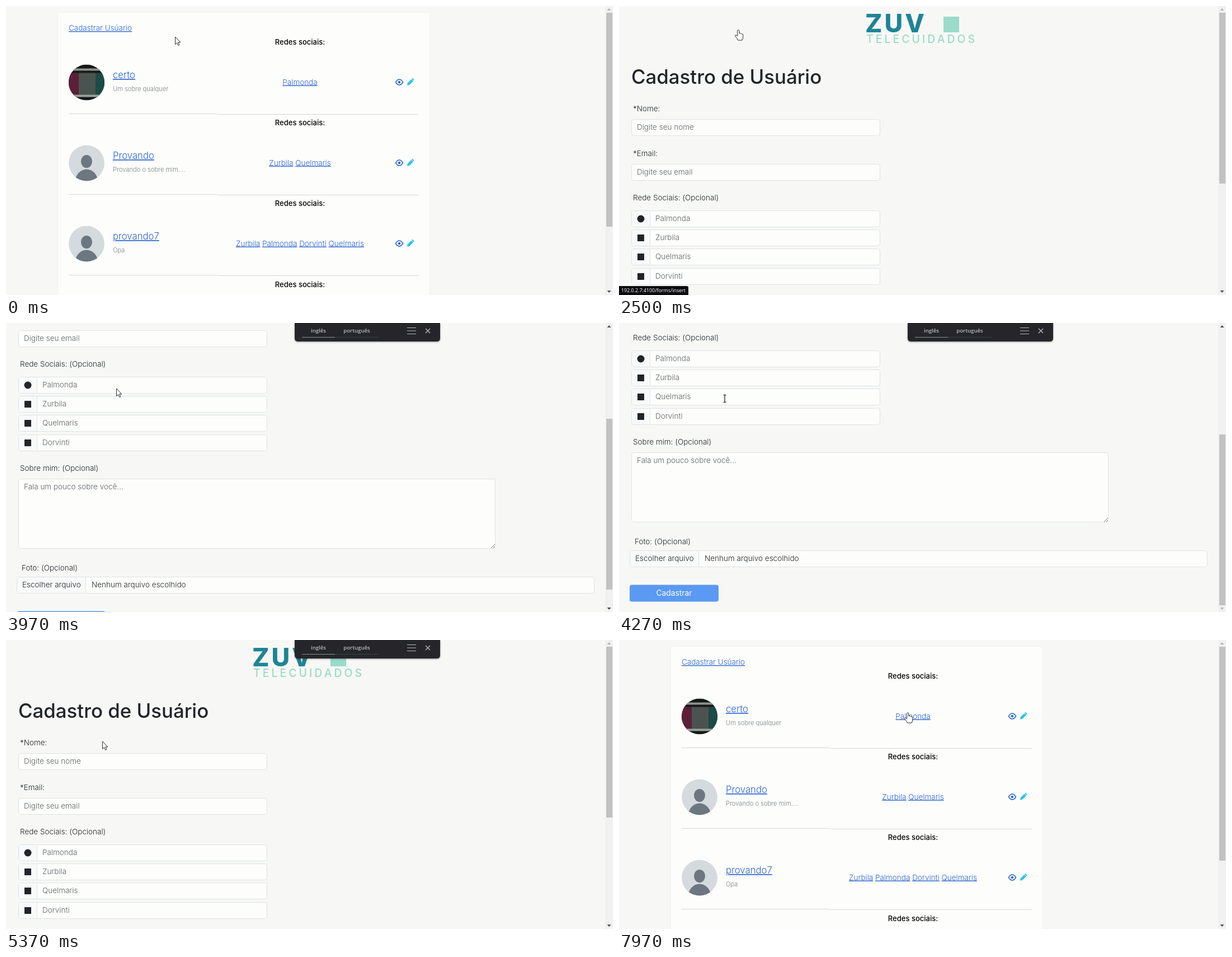
Write an HTML page that moves like this. It is 1085 by 516 pixels and loops after 8 s.

```html
<!DOCTYPE html>
<html lang="pt-BR">
<head>
<meta charset="utf-8">
<title>Cadastro</title>
<style>
  html, body { margin: 0; width: 100%; height: 100%; overflow: hidden; background: #f7f8f6; }
  svg { display: block; position: absolute; left: 0; top: 0; }
  text {
    font-family: Inter, "Open Sans", sans-serif; font-size: 13.5px; font-weight: 300;
    font-feature-settings: "calt" 0; fill: #212529;
  }
  .link { fill: #2a63d4; text-decoration: underline; }
  .mid { text-anchor: middle; }
  .head { font-size: 13px; font-weight: 500; fill: #000; }
  .user { font-size: 16.7px; }
  .about { font-size: 11.15px; fill: #7a8186; }
  .title { font-size: 34.8px; font-weight: 500; }
  .hint { fill: #5c6268; }
  .brand { font-size: 45px; font-weight: 800; letter-spacing: 4px; fill: #1f8496; }
  .tagline { font-size: 19.5px; font-weight: 500; letter-spacing: 4px; fill: #9adbc9; }
  .button { font-weight: 400; fill: #fff; font-size: 13.8px; }
  .tab { font: 600 9.6px "Open Sans", "Noto Sans", sans-serif; fill: #b3b9bd; }
  .field { fill: #fdfdfb; stroke: #dee2e6; }
  #status {
    position: absolute; left: 0; bottom: 0; height: 16px; padding: 0 5px 0 4px;
    font: 8.9px/16px "Open Sans", "Noto Sans", sans-serif; color: #fff;
    background: #0b0b10; border-top-right-radius: 3px; white-space: nowrap;
  }
</style>
</head>
<body>
<svg id="stage" width="1085" height="516" viewBox="0 0 1085 516"></svg>
<div id="status"></div>
<script>
const LOOP = 8000, VIEW = 516, TRACK_TOP = 12, TRACK = 492;
const LIST_MAX = 149, FORM_MAX = 316;
const FORM_START = 2500, FORM_END = 6630;
const $ = id => document.getElementById(id);

const text = (x, y, cls, str) => `<text x="${x}" y="${y}" class="${cls}">${str}</text>`;
const rect = (x, y, w, h, attrs = '') => `<rect x="${x}" y="${y}" width="${w}" height="${h}" ${attrs}/>`;
const line = (x1, y1, x2, y2, color) => `<path d="M${x1} ${y1}L${x2} ${y2}" stroke="${color}" fill="none"/>`;

// List page
const photo = `<g clip-path="url(#round)">
  ${rect(-32, -32, 64, 64, 'fill="#17191b"')}
  ${rect(-32, -17, 18, 41, 'fill="#5c1f38"')}
  ${rect(-14, -17, 30, 41, 'fill="#4b5350"')}
  ${rect(16, -17, 16, 41, 'fill="#1c4b46"')}
  ${rect(-24, -25, 48, 4, 'fill="#8d9488"')}
  ${rect(-32, 22, 64, 4, 'fill="#9aa199"')}</g>`;

const silhouette = `<g clip-path="url(#round)">
  <circle r="32" fill="#d4dadd"/>
  <ellipse cy="-3" rx="10" ry="11.5" fill="#6c777f"/>
  <ellipse cy="34" rx="20.5" ry="23" fill="#6c777f"/></g>`;

const eye = `<g transform="translate(703 136)" fill="none" stroke="#2a63d4" stroke-width="1.5">
  <path d="M-6.5 0Q-3.5-5 0-5T6.5 0Q3.5 5 0 5T-6.5 0Z"/><circle r="2.2" fill="#2a63d4" stroke="none"/></g>`;

const pencil = `<g transform="translate(722.5 136) rotate(45)" fill="#2bc6e6">
  <path d="M-2.4-5.2H2.4V4.2L0 8L-2.4 4.2Z"/>${rect(-2.4, -8.2, 4.8, 2.2, 'rx="1"')}</g>`;

const people = [
  ['certo', 'Um sobre qualquer', ['Palmonda']],
  ['Provando', 'Provando o sobre mim....', ['Zurbila', 'Quelmaris']],
  ['provando7', 'Opa', ['Zurbila', 'Palmonda', 'Dorvinti', 'Quelmaris']],
  ['provando8', 'Opa', ['Quelmaris']]
];

const person = ([name, about, nets], i) => `<g transform="translate(0 ${Math.round(i * 144.2)})">
  ${text(525.5, 69, 'mid head', 'Redes sociais:')}
  <g transform="translate(144 136.5)">${i ? silhouette : photo}</g>
  ${text(191, 129, 'user link', name)}
  ${text(191, 152, 'about', about)}
  ${text(525.5, 140.5, 'mid', nets.map(n => `<tspan class="link">${n}</tspan>`).join(' '))}
  ${eye}${pencil}
  ${line(112, 192.5, 377, 192.5, '#d3d5da')}${line(378, 193.5, 738, 193.5, '#d5d7dc')}</g>`;

const listPage = `<g id="list">
  ${rect(92.5, 11.5, 665, 634, 'rx="3" fill="#fdfdfb" stroke="#f0f1f0"')}
  ${text(112, 44, 'link', 'Cadastrar Usúario')}
  ${people.map(person).join('')}</g>`;

// Form page
const field = (x, y, w, h) => rect(x + .5, y + .5, w, h, 'rx="4" class="field"');
const input = (y, hint) => field(22, y, 444, 29) + text(32, y + 19.3, 'hint', hint);

const network = (name, i) => {
  const y = 365 + Math.round(i * 34.2);
  const mark = i ? rect(33, y + 9, 12, 12, 'fill="#212529"')
                 : `<circle cx="39" cy="${y + 15}" r="6.5" fill="#212529"/>`;
  return field(22, y, 444, 29) + rect(23, y + 1, 32, 28, 'rx="3" fill="#f8f9f9"')
    + line(55.5, y, 55.5, y + 30, '#dee2e6') + mark + text(65, y + 19.3, 'hint', name);
};

const formPage = `<g id="form">
  ${text(440, 47, 'brand', 'ZUV')}
  ${rect(580, 19, 28, 28, 'fill="#9adbc9"')}
  ${text(442, 66, 'tagline', 'TELECUIDADOS')}
  ${text(22, 139, 'title', 'Cadastro de Usuário')}
  ${text(25, 188, '', '*Nome:')}${input(202, 'Digite seu nome')}
  ${text(25, 267.5, '', '*Email:')}${input(282, 'Digite seu email')}
  ${text(25, 347, '', 'Rede Sociais: (Opcional)')}
  ${['Palmonda', 'Zurbila', 'Quelmaris', 'Dorvinti'].map(network).join('')}
  ${text(25, 532.5, '', 'Sobre mim: (Opcional)')}
  ${field(22, 547, 852, 124)}${text(32, 566, 'hint', 'Fala um pouco sobre você...')}
  ${line(867, 671, 874, 664, '#777')}${line(871, 671, 874, 668, '#777')}
  ${text(28, 710.5, '', 'Foto: (Opcional)')}
  ${field(19, 722, 1032, 29)}${rect(20, 723, 122, 28, 'rx="3" fill="#f8f9f9"')}
  ${line(142.5, 722, 142.5, 752, '#dee2e6')}
  ${text(29, 741, '', 'Escolher arquivo')}${text(153, 741, '', 'Nenhum arquivo escolhido')}
  ${rect(19, 783.5, 159, 30, 'rx="4" fill="#5b9af2"')}
  ${text(98.5, 803, 'mid button', 'Cadastrar')}</g>`;

// Browser parts
const popup = `<g id="popup"><g filter="url(#shade)">
  <path d="M516 0H776V27Q776 33 770 33H522Q516 33 516 27Z" fill="#25282b"/></g>
  ${text(558.5, 17, 'mid tab', 'inglês')}${text(627, 17, 'mid tab', 'português')}
  ${line(529, 25.5, 588, 25.5, '#8b9094')}${line(588, 25.5, 666, 25.5, '#3c4246')}
  ${[8.5, 14, 19.5].map(y => line(717, y, 733, y, '#b3b9bd')).join('')}
  <path d="M750 10l8 8m0-8l-8 8" stroke="#b3b9bd" stroke-width="1.4"/></g>`;

const scrollbar = `${rect(1071, 0, 14, VIEW, 'fill="#f1f1f1"')}
  <path id="up" d="M1074.5 8h7l-3.5-4z"/><path id="down" d="M1074.5 508h7l-3.5 4z"/>
  <rect id="thumb" x="1073" width="11" fill="#c1c1c1"/>`;

const cursor = `<g id="cursor" fill="#fff" stroke="#111" stroke-width=".9" stroke-linejoin="round">
  <path id="arrow" d="M.5 0V13.5L3.6 10.7L5.7 15.4L7.8 14.5L5.8 9.9H9.8Z"/>
  <path id="hand" d="M-2.4.8Q-.8-1.3.8.8V5.6Q2.6 4.6 3.4 6.4Q5.2 5.6 5.8 7.2Q7.8 6.6 7.8 8.8V12Q7.8 14.6 6.2 18H-1.4Q-3.2 14.6-6.2 10.8Q-7 8.4-4.6 8.8L-2.4 10.6Z"/>
  <path id="beam" fill="none" stroke-width="1.2" d="M-2.5-6.5H-.5L0-6L.5-6.5H2.5M0-6V6M-2.5 6.5H-.5L0 6L.5 6.5H2.5"/></g>`;

$('stage').innerHTML = `<defs>
  <clipPath id="round"><circle r="32"/></clipPath>
  <filter id="shade" x="-5%" y="-20%" width="110%" height="150%">
    <feDropShadow dx="0" dy="1" stdDeviation="1.5" flood-opacity=".4"/></filter></defs>
  ${listPage}${formPage}${scrollbar}${popup}${cursor}`;

// Motion: each key is [time, ...values]
const scrollKeys = [
  [30, 0], [500, LIST_MAX], [900, LIST_MAX], [1650, 0],
  [3430, 0], [3570, 95], [3800, 190], [4030, 285], [4270, FORM_MAX],
  [4970, FORM_MAX], [5340, 0], [5430, 0], [5770, FORM_MAX], [5800, FORM_MAX], [6200, 0]
];
const cursorKeys = [
  [300, 302, 55], [830, 600, 180], [1730, 716, 220], [2150, 214, 43], [2600, 214, 43],
  [3200, 213, 80], [3600, 213, 80], [4200, 189, 135], [4290, 189, 135], [4570, 173, 192],
  [4730, 173, 192], [4830, 171, 193], [4970, 171, 193], [5370, 172, 181], [5950, 172, 181],
  [6180, 150, -30], [6630, 110, -30], [6900, 110, 40], [7300, 205, 119], [7470, 205, 119],
  [7900, 517, 130]
];

const clamp = v => Math.max(0, Math.min(1, v));
const within = (t, a, b) => t >= a && t < b;

function sample(keys, t) {
  const next = keys.findIndex(k => k[0] > t);
  if (next < 0) return keys[keys.length - 1].slice(1);
  if (next === 0) return keys[0].slice(1);
  const a = keys[next - 1], b = keys[next];
  const p = (t - a[0]) / (b[0] - a[0]), e = p * p * (3 - 2 * p);
  return a.slice(1).map((v, i) => v + (b[i + 1] - v) * e);
}

const show = (id, on) => { $(id).style.display = on ? '' : 'none'; };

function drawScroll(t, onForm) {
  const [scroll] = sample(scrollKeys, t), max = onForm ? FORM_MAX : LIST_MAX;
  const size = Math.round(VIEW / (VIEW + max) * TRACK);
  $(onForm ? 'form' : 'list').setAttribute('transform', `translate(0 ${-Math.round(scroll)})`);
  $('thumb').setAttribute('y', Math.round(TRACK_TOP + scroll / max * (TRACK - size)));
  $('thumb').setAttribute('height', size);
  $('up').setAttribute('fill', scroll < 1 ? '#b5b5b5' : '#505050');
  $('down').setAttribute('fill', scroll > max - 1 ? '#b5b5b5' : '#505050');
}

function drawPopup(t) {
  const shown = Math.min(clamp((t - 2800) / 140), clamp((6334 - t) / 140));
  const scale = .94 + .06 * shown;
  show('popup', shown > 0);
  $('popup').setAttribute('opacity', shown);
  $('popup').setAttribute('transform', `translate(646 0) scale(${scale}) translate(-646 0)`);
}

function drawCursor(t) {
  const [x, y] = sample(cursorKeys, t);
  const hand = within(t, 2080, 2650) || within(t, 7200, 7560) || t >= 7800;
  const beam = within(t, 4150, 4420);
  $('cursor').setAttribute('transform', `translate(${Math.round(x)} ${Math.round(y)})`);
  show('hand', hand);
  show('beam', beam);
  show('arrow', !hand && !beam);
}

function draw(t) {
  const onForm = within(t, FORM_START, FORM_END);
  show('form', onForm);
  show('list', !onForm);
  drawScroll(t, onForm);
  drawPopup(t);
  drawCursor(t);
  show('status', within(t, 2050, 2700) || within(t, 7200, 7600));
  $('status').textContent = '192.0.2.7:4100/forms/' + (t < 5000 ? 'insert' : '1');
}

let start;
function tick(now) {
  start ??= now;
  draw((now - start) % LOOP);
  requestAnimationFrame(tick);
}
draw(0);
requestAnimationFrame(tick);
</script>
</body>
</html>
```
